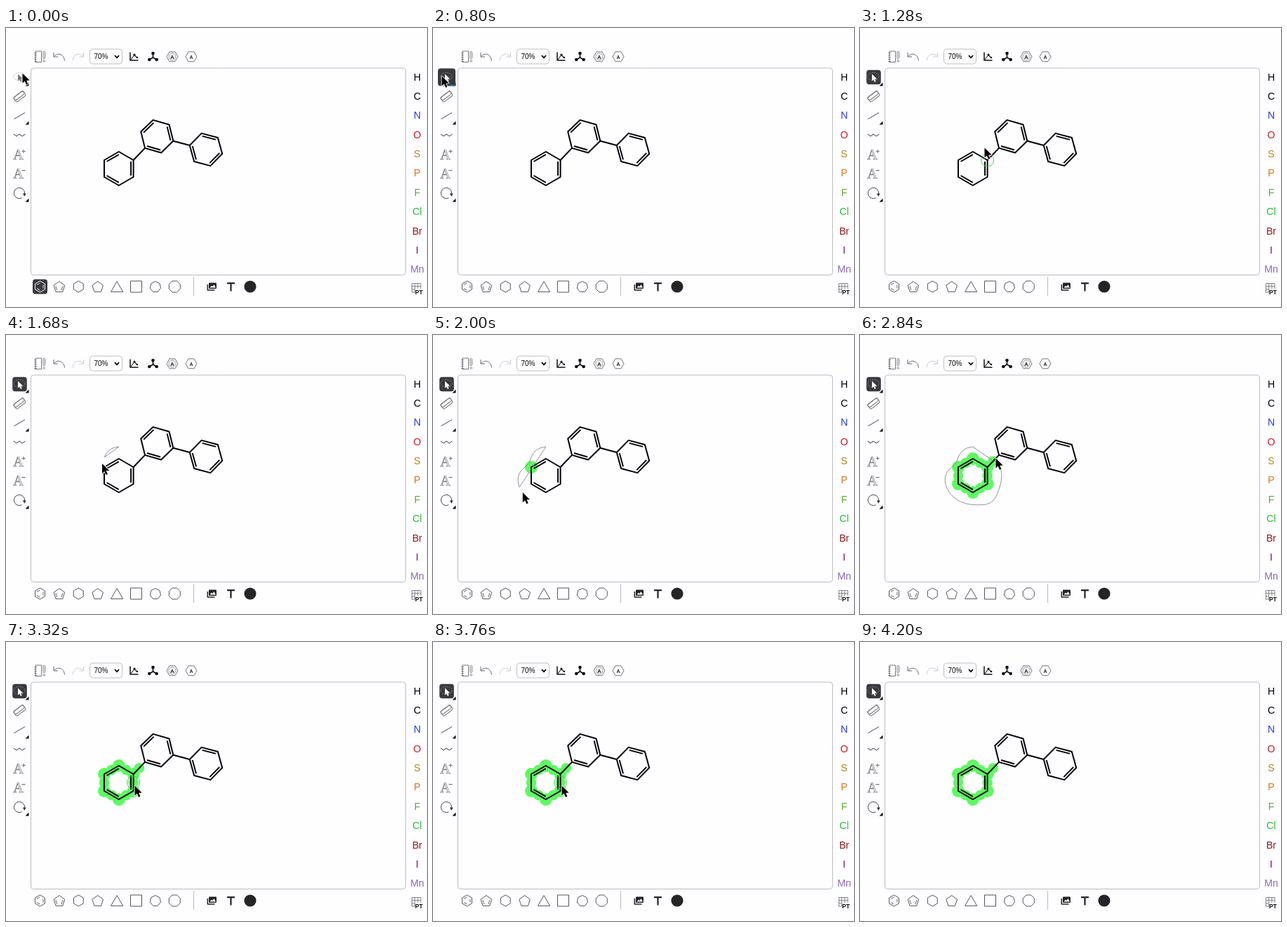
Recreate the animation shown at these times as an HTML page with a canvas. Size 600 by 397 pixels, loop 4720 ms.

```html
<!DOCTYPE html>
<html lang="en">
<head>
<meta charset="utf-8">
<title>Lasso selection in a molecule editor</title>
<style>
html, body { margin: 0; width: 100%; height: 100%; overflow: hidden; background: #fefdff; }
canvas { display: block; }
</style>
</head>
<body>
<canvas id="stage" width="600" height="397"></canvas>
<script>
const ctx = document.getElementById('stage').getContext('2d');
const LOOP = 4720, STEP = 40, LAG = 60;
const ACTIVATE = 720, DRAG = 1480, DRAG_END = 2840, RELEASE = 2900, LEAVE = 4200;
const SANS = '"Liberation Sans", Arial, sans-serif';
const SERIF = '"Liberation Serif", Times, serif';
const INK = '#222', THIN = '#555', DARK = '#39393d', GREEN = '#5ef962';

// Drawing helpers

function ngon(x, y, r, n, deg = -90) {
  return Array.from({ length: n }, (_, i) => {
    const a = (deg + i * 360 / n) * Math.PI / 180;
    return [x + r * Math.cos(a), y + r * Math.sin(a)];
  });
}

const shrink = (pts, x, y, s) => pts.map(p => [x + (p[0] - x) * s, y + (p[1] - y) * s]);
const edge = (pts, i) => [pts[i], pts[(i + 1) % pts.length]];
const mid = ([a, b]) => [(a[0] + b[0]) / 2, (a[1] + b[1]) / 2];

function trace(pts, close) {
  ctx.beginPath();
  pts.forEach(p => ctx.lineTo(p[0], p[1]));
  if (close) ctx.closePath();
}

function stroke(color, width) {
  ctx.strokeStyle = color;
  ctx.lineWidth = width;
  ctx.stroke();
}

function line(pts, color = INK, width = 1, close = false) {
  trace(pts, close);
  stroke(color, width);
}

function fill(pts, color) {
  trace(pts, true);
  ctx.fillStyle = color;
  ctx.fill();
}

function disc(x, y, r, color) {
  ctx.beginPath();
  ctx.arc(x, y, r, 0, 7);
  ctx.fillStyle = color;
  ctx.fill();
}

function arc(x, y, r, a, b, color = INK, width = 1) {
  ctx.beginPath();
  ctx.arc(x, y, r, a, b);
  stroke(color, width);
}

function box(x, y, w, h, r, color, back) {
  ctx.beginPath();
  ctx.roundRect(x, y, w, h, r);
  if (back) { ctx.fillStyle = back; ctx.fill(); }
  if (color) stroke(color, 1);
}

function text(s, x, y, font, color = INK) {
  ctx.font = font;
  ctx.fillStyle = color;
  ctx.fillText(s, x, y);
}

function outline(s, x, y, size) {
  ctx.font = size + 'px ' + SERIF;
  ctx.strokeStyle = '#777';
  ctx.lineWidth = 0.7;
  ctx.strokeText(s, x, y);
}

function at(x, y, paint, angle = 0, flip = 1) {
  ctx.save();
  ctx.translate(x, y);
  ctx.rotate(angle);
  ctx.scale(flip, 1);
  paint();
  ctx.restore();
}

// Molecule: three rings in a row, joined by single bonds

const rings = [[160.8, 200, -90], [215.3, 154.2, -104], [285, 173, -165.4]]
  .map(([x, y, deg]) => ({ x, y, pts: ngon(x, y, 24, 6, deg) }));
const links = [
  [rings[0].pts[1], rings[1].pts[4]],
  [rings[1].pts[2], rings[2].pts[0]]
];
const atoms = rings.flatMap(r => r.pts);
const bonds = rings.flatMap(r => r.pts.map((_, i) => mid(edge(r.pts, i))))
  .concat(links.map(mid));

function molecule() {
  for (const r of rings) {
    line(r.pts, '#000', 2, true);
    const inner = shrink(r.pts, r.x, r.y, 0.83);
    for (const i of [1, 3, 5]) line(edge(inner, i), '#000', 1.9);
  }
  links.forEach(l => line(l, '#000', 2));
}

// Pointer: eased moves between stops, and one turn around the first ring

const APPROACH = [[0, 23, 64], [440, 12, 68], [880, 12, 68], [1200, 181, 187], [1280, 177, 170], [DRAG, 161, 159]];
const DEPART = [[DRAG_END, 193, 175], [3320, 183, 204], [3840, 183, 204], [4160, 72, 16]];

function along(stops, t) {
  let i = 1;
  while (i < stops.length - 1 && stops[i][0] < t) i++;
  const [t0, x0, y0] = stops[i - 1], [t1, x1, y1] = stops[i];
  const k = Math.min(1, Math.max(0, (t - t0) / (t1 - t0)));
  const e = k * k * (3 - 2 * k);
  return [x0 + (x1 - x0) * e, y0 + (y1 - y0) * e];
}

const bump = (a, center, width) => Math.exp(-(((a - center) / width) ** 2));

// Sweep angle in degrees; the hand cuts in at upper left and swings out at lower right
function orbit(t) {
  const k = (t - DRAG) / (DRAG_END - DRAG);
  const sweep = 308 * k + 11 * Math.sin(2 * Math.PI * k);
  const r = 41 - 11 * bump(sweep, 55, 28) + 5 * bump(sweep, 215, 22);
  return ngon(rings[0].x, rings[0].y, r, 1, -90 - sweep)[0];
}

function pointer(t) {
  if (t < DRAG) return along(APPROACH, t);
  return t < DRAG_END ? orbit(t) : along(DEPART, t);
}

// Selection

function lasso(t) {
  const end = Math.min(t, RELEASE) - LAG, pts = [];
  for (let s = DRAG; s < end; s += 20) pts.push(pointer(s));
  if (end > DRAG) pts.push(pointer(end));
  return pts;
}

function inside([x, y], poly) {
  return poly.reduce((hit, [ax, ay], i) => {
    const [bx, by] = poly[(i + 1) % poly.length];
    const cross = (ay > y) !== (by > y) && x < ax + (bx - ax) * (y - ay) / (by - ay);
    return cross ? !hit : hit;
  }, false);
}

function hovered(t) {
  const [x, y] = pointer(t - LAG);
  const dist = p => Math.hypot(p[0] - x, p[1] - y);
  const best = atoms.concat(bonds).reduce((a, b) => dist(b) < dist(a) ? b : a);
  return dist(best) < 13 ? best : null;
}

function sketch(t) {
  const loop = lasso(t);
  const mark = (spots, r) =>
    spots.filter(p => inside(p, loop)).forEach(p => disc(p[0], p[1], r, GREEN));
  mark(atoms, 9);
  mark(bonds, 7.3);
  molecule();
  if (t >= DRAG && t < RELEASE) return line(loop, '#858585', 0.9, true);
  const p = t < LEAVE && hovered(t);
  if (p) arc(p[0], p[1], 9, 0, 7, '#43d04b');
}

// Toolbars

const ARROW = [[0, 0], [0, 16], [3.7, 12.6], [6.3, 18.4], [9, 17.2], [6.5, 11.6], [11.6, 11.4]];

function arrow(x, y, s, color, rim) {
  const pts = ARROW.map(p => [x + p[0] * s, y + p[1] * s]);
  if (rim) line(pts, rim, 1.6, true);
  fill(pts, color);
}

const corner = y => fill([[32.5, y], [32.5, y - 5], [27.5, y]], '#111');

function lassoButton(t) {
  const active = t >= ACTIVATE, over = pointer(t)[0] < 33 && t < DRAG;
  const half = over ? 12.5 : 10.3;
  corner(82.5);
  if (active) box(19.5 - half, 70 - half, 2 * half, 2 * half, 4, null, DARK);
  ctx.beginPath();
  ctx.ellipse(19, 69, 8, 5.5, 0, 0, 7);
  ctx.setLineDash([1.5, 1.5]);
  stroke(active ? '#aaa' : '#999', 0.8);
  ctx.setLineDash([]);
  arrow(17, 65.5, 0.62, active ? '#fff' : '#777');
  if (active && over) line([[24, 81.8], [32, 81.8]], '#278aa8', 1.5);
}

function leftBar(t) {
  lassoButton(t);
  at(19.5, 97.5, () => {
    box(-8.5, -4, 17, 5, 2, '#777');
    box(-8.5, -4, 17, 8, 2, '#777');
  }, -0.65);
  line([[11.5, 129.5], [27, 120.5]], '#333', 0.9);
  line(Array.from({ length: 5 }, (_, i) => [11 + i * 4.1, i % 2 ? 154 : 151]), '#333', 1);
  ['+', '−'].forEach((sign, i) => {
    outline('A', 17.5, 187 + i * 27.4, 20);
    outline(sign, 25, 178.5 + i * 27.4, 10);
  });
  arc(19, 235, 7.6, 1.1, 6.5, '#444', 1);
  fill(ngon(26.3, 237, 2.8, 3, 90), '#333');
  corner(137.5);
  corner(247.5);
}

function turnArrow(color) {
  line([[-7.5, -6], [-7.5, 0], [-1.5, 0]], color, 0.9);
  ctx.beginPath();
  ctx.moveTo(-7, -0.5);
  ctx.bezierCurveTo(-3, -6, 7, -5, 8, 5.5);
  stroke(color, 0.9);
}

function topBar() {
  box(42, 33, 8.5, 15.5, 0, '#777');
  for (let y = 35.5; y < 48; y += 3) line([[40.5, y], [43.5, y]], THIN, 0.9);
  box(53, 33.5, 2.6, 10, 1, '#777');
  arc(54.3, 47, 1.3, 0, 7, '#777', 0.8);

  at(75.5, 41, () => turnArrow('#555'));
  at(103, 41, () => turnArrow('#c4c4c4'), 0, -1);

  box(119.5, 30, 46, 21, 4, '#c0c0c0', '#fff');
  text('70%', 135.5, 44.2, '10px ' + SANS, '#000');
  line([[155, 39], [158, 42.3], [161, 39]], '#000', 1.8);

  line([[177, 34.5], [177, 46], [188.5, 46]], '#111', 1.5);
  line([[177, 46], [183, 38.5], [187, 42.5]], INK, 1.1);
  disc(183, 38, 1.6, '#111');
  disc(187, 42, 1.3, '#111');

  for (const p of ngon(209.5, 42, 6, 3)) {
    line([[209.5, 42], p], '#111', 1.7);
    disc(p[0], p[1], 2.3, '#111');
  }

  for (const [x, size] of [[237, 8], [264, 7]]) {
    line(ngon(x, 40.8, 8, 6, 0), '#666', 0.9, true);
    text('A', x, 43.6, 'bold ' + size + 'px ' + SANS);
  }
  arc(237, 40.8, 5, 0, 7, '#888', 0.8);
}

// Shapes share one visual height, so the radius follows from the side count
function ringIcon(x, n, double, color) {
  const c = Math.cos(Math.PI / n), flat = n % 4 === 0, odd = n % 2;
  const r = odd ? 14.8 / (1 + c) : flat ? 8 / c : 8;
  const y = 368 + (odd ? r * (1 - c) / 2 : 0);
  const pts = ngon(x, y, r, n, flat ? -90 + 180 / n : -90);
  line(pts, color, 1, true);
  const inner = shrink(pts, x, y, 0.64);
  if (double) for (let i = 1; i < n; i += 2) if (i < 4 || n === 6) line(edge(inner, i), color, 0.9);
}

function bottomBar(t) {
  const active = t < ACTIVATE;
  if (active) box(38, 357.5, 21, 21, 4, null, DARK);
  [6, 5, 6, 5, 3, 4, 7, 8].forEach((n, i) =>
    ringIcon(48.5 + i * 27.4, n, i < 2, active && !i ? '#fff' : THIN));
  line([[267.5, 354], [267.5, 381]], '#bbb');

  box(289, 362.5, 11, 8.5, 1, null, INK);
  line([[287.3, 365], [287.3, 373], [297.5, 373]], INK, 1.5);
  fill([[290.5, 369.5], [293, 366.5], [294.5, 368], [296.5, 365], [299, 369.5]], '#fff');
  line([[315, 363.2], [326, 363.2]], INK, 2.2);
  line([[320.5, 363], [320.5, 374.5]], INK, 2.2);
  disc(348, 368, 8.6, '#252525');
}

const ELEMENTS = {
  H: '#000', C: '#000', N: '#2a3fd8', O: '#cf1820', S: '#b5851a', P: '#de7414',
  F: '#5aab38', Cl: '#2abb30', Br: '#8c1c1c', I: '#6c1478', Mn: '#8a6cb0'
};

function rightBar() {
  Object.entries(ELEMENTS).forEach(([name, color], i) =>
    text(name, 586, 74.6 + i * 27.37, '14.2px ' + SANS, color));
  for (let i = 0; i < 4; i++) {
    const d = i * 4.2;
    line([[578.5 + d, 363.5], [578.5 + d, i > 1 ? 371 : 376.5]], '#777', 0.9);
    line([[578.5, 363.5 + d], [i > 1 ? 583 : 591.2, 363.5 + d]], '#777', 0.9);
  }
  text('PT', 588.5, 379, 'bold 8.5px ' + SANS, '#111');
}

function draw(t) {
  ctx.fillStyle = '#fefdff';
  ctx.fillRect(0, 0, 600, 397);
  box(35.5, 57, 534, 294.5, 4, '#bdbdbd');
  topBar();
  leftBar(t);
  bottomBar(t);
  rightBar();
  sketch(t);
  if (t < LEAVE) {
    const [x, y] = pointer(t);
    arrow(x + 0.5, y + 0.5, 0.88, '#000', '#fff');
  }
}

ctx.lineJoin = 'round';
ctx.textAlign = 'center';
const start = performance.now();
function tick() {
  const t = (performance.now() - start) % LOOP;
  draw(Math.floor(t / STEP) * STEP);
  requestAnimationFrame(tick);
}
tick();
</script>
</body>
</html>
```
